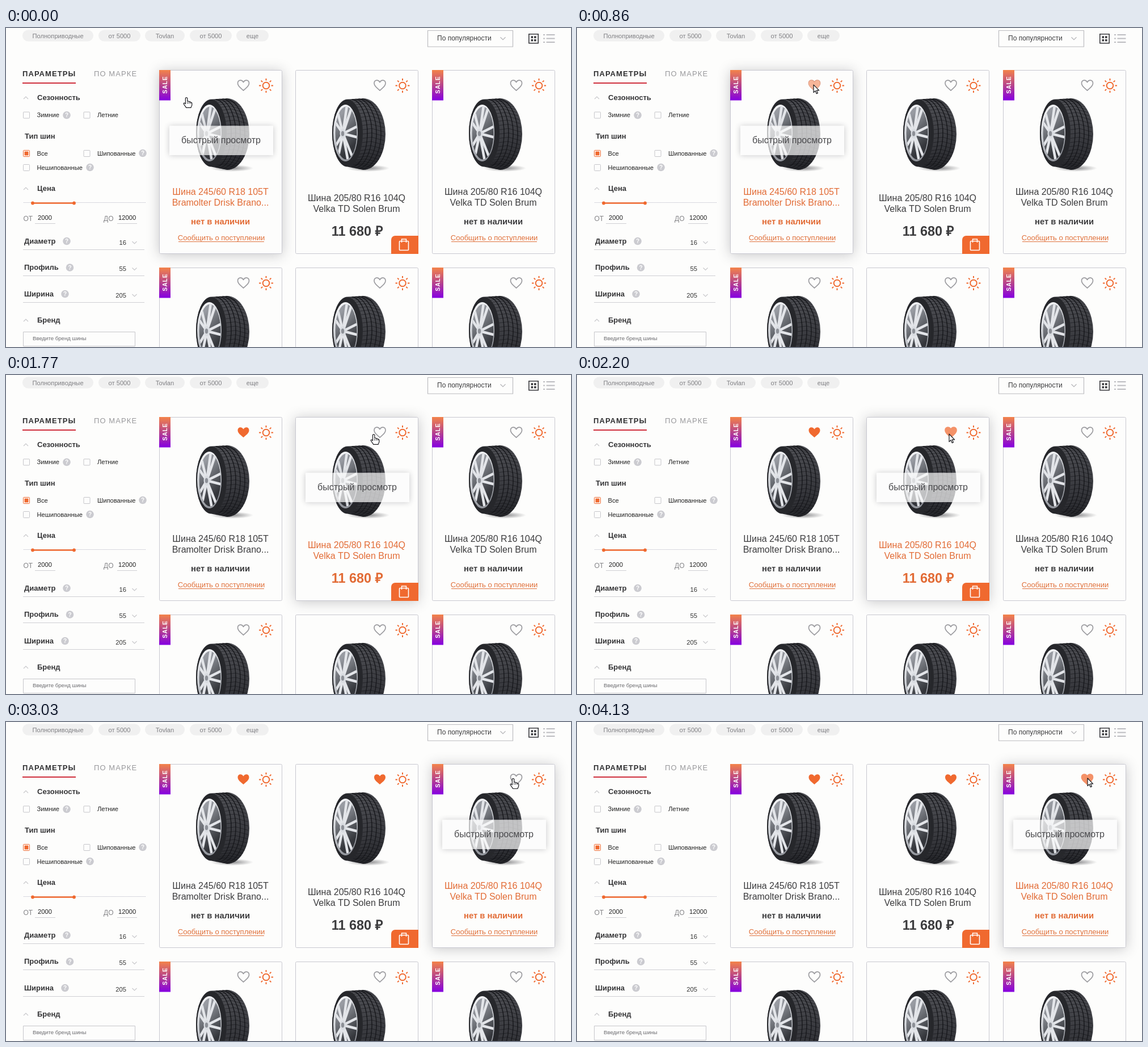
Write an HTML page with a canvas that moves like this. It is 996x562 px and loops after 4160 ms.

```html
<!DOCTYPE html>
<html lang="ru">
<head>
<meta charset="utf-8">
<title>Каталог шин</title>
<style>
html, body { margin: 0; width: 100%; height: 100%; overflow: hidden; background: #fdfdfc; }
canvas { display: block; width: 996px; height: 562px; }
</style>
</head>
<body>
<canvas id="stage"></canvas>
<script>
const W = 996, H = 562, LOOP = 4160;
const FONT = '"Liberation Sans", Arial, sans-serif';
const ORANGE = '#f0692f', BG = '#fdfdfc', LINE = '#cfcfd3';
const DARK = [60, 60, 62], HOT = [226, 107, 53];

const canvas = document.getElementById('stage');
const ctx = canvas.getContext('2d');
const dpr = window.devicePixelRatio || 1;
canvas.width = W * dpr;
canvas.height = H * dpr;

const clamp = v => Math.max(0, Math.min(1, v));
const ramp = (t, start, len) => clamp((t - start) / len);
const mix = (a, b, k) => `rgb(${a.map((v, i) => Math.round(v + (b[i] - v) * k)).join()})`;

// y is the middle of the capital letters
function text(s, x, y, size, color, { bold, align = 'left', gap = 0 } = {}) {
  ctx.font = `${bold ? 'bold ' : ''}${size}px ${FONT}`;
  ctx.letterSpacing = gap + 'px';
  ctx.textAlign = align;
  ctx.fillStyle = color;
  ctx.fillText(s, x, Math.floor(y + size * 0.36));
}

function line(points, color, width = 1) {
  ctx.beginPath();
  points.forEach(([x, y]) => ctx.lineTo(x, y));
  ctx.strokeStyle = color;
  ctx.lineWidth = width;
  ctx.stroke();
}

function box(x, y, w, h, color, width = 1, r = 0) {
  ctx.beginPath();
  ctx.roundRect(x, y, w, h, r);
  ctx.strokeStyle = color;
  ctx.lineWidth = width;
  ctx.stroke();
}

function fillBox(x, y, w, h, color, r = 0) {
  ctx.beginPath();
  ctx.roundRect(x, y, w, h, r);
  ctx.fillStyle = color;
  ctx.fill();
}

function disc(x, y, r, color) {
  ctx.beginPath();
  ctx.arc(x, y, r, 0, 7);
  ctx.fillStyle = color;
  ctx.fill();
}

function oval(x, y, rx, ry, color) {
  ctx.beginPath();
  ctx.ellipse(x, y, rx, ry, 0, 0, 7);
  ctx.fillStyle = color;
  ctx.fill();
}

function gradient(x0, y0, x1, y1, ...colors) {
  const g = ctx.createLinearGradient(x0, y0, x1, y1);
  colors.forEach((c, i) => g.addColorStop(i / (colors.length - 1), c));
  return g;
}

const chevron = (x, y, dir, color = '#c9c9cc', r = 4) =>
  line([[x - r, y - dir * r / 2], [x, y + dir * r / 2], [x + r, y - dir * r / 2]], color, 1.2);

function help(x, y) {
  disc(x, y, 6.8, '#cbcbd0');
  text('?', x, y + 0.5, 10, '#fff', { bold: true, align: 'center' });
}

function check(x, y, label, on) {
  box(x - 5.5, y - 5.5, 11, 11, on ? ORANGE : '#c6c6ca', 1, 1);
  if (on) fillBox(x - 3.5, y - 3.5, 7, 7, ORANGE);
  text(label, x + 18.5, y, 11.2, '#222');
}

function header() {
  [['Полноприводные', 29, 125], ['от 5000', 163, 74], ['Tovlan', 245, 70],
   ['от 5000', 324, 74], ['еще', 406, 57]].forEach(([s, x, w]) => {
    fillBox(x, 3.5, w, 20, '#f0f0f0', 10);
    text(s, x + w / 2, 14, 11.2, '#808084', { align: 'center' });
  });
  box(743.5, 4.5, 150, 28.5, '#bcbcc0', 1.2);
  text('По популярности', 760, 18.5, 12, '#3c3c3e');
  chevron(876, 18.5, 1, '#b5b5b9', 4.5);
  box(921.8, 10.8, 16.4, 16, '#3a3a3e', 1.6);
  for (const x of [925.5, 931]) for (const y of [14.3, 19.8]) fillBox(x, y, 3.6, 3.6, '#3a3a3e');
  for (const y of [12, 18.5, 25]) {
    fillBox(947, y - 1, 3, 2, '#bcbcc0');
    fillBox(952.5, y - 1, 15, 2, '#bcbcc0');
  }
}

function sidebar() {
  const title = (s, x, y) => text(s, x, y, 13, '#353537', { bold: true });
  text('ПАРАМЕТРЫ', 29, 80.5, 13, '#2f2f31', { bold: true, gap: 1.1 });
  text('ПО МАРКЕ', 155, 80.5, 13, '#98989b', { gap: 1.1 });
  fillBox(29, 96, 94, 2, '#cf2f3c');

  [['Сезонность', 123], ['Цена', 283], ['Бренд', 515]].forEach(([s, y]) => {
    chevron(35, y, -1);
    title(s, 55, y);
  });
  check(36, 153.5, 'Зимние');
  help(107, 153.5);
  check(142.5, 153.5, 'Летние');
  title('Тип шин', 33, 191);
  check(36, 221, 'Все', true);
  check(142.5, 221, 'Шипованные');
  help(241, 220.5);
  check(36, 246, 'Нешипованные');
  help(148, 245.5);

  ctx.setLineDash([1, 1]);
  line([[31, 307.5], [247, 307.5]], '#b4b4c4');
  ctx.setLineDash([]);
  line([[47, 308.5], [120, 308.5]], ORANGE, 2.5);
  disc(47, 308.5, 2.9, ORANGE);
  disc(120, 308.5, 2.9, ORANGE);
  text('ОТ', 30.5, 336, 12, '#858588');
  text('2000', 56, 334.5, 11.2, '#222');
  text('ДО', 172, 336, 12, '#858588');
  text('12000', 198, 334.5, 11.2, '#222');
  line([[51, 344.5], [87, 344.5]], LINE);
  line([[196, 344.5], [231, 344.5]], LINE);

  [['Диаметр', '16', 107, 375.5], ['Профиль', '55', 112.5, 422], ['Ширина', '205', 104, 468.5]]
    .forEach(([s, value, hx, y]) => {
      title(s, 32, y);
      help(hx, y);
      text(value, 212, y + 2.5, 11.2, '#333', { align: 'right' });
      chevron(226.5, y + 2.5, 1);
      const base = Math.round(y + 15) - 0.5;
      line([[30, base], [244, base]], LINE);
    });
  box(30.5, 535.5, 197, 25, '#c6c6ca');
  text('Введите бренд шины', 47, 547.5, 9.6, '#6c6c70');
}

function tire() {
  const floor = ctx.createRadialGradient(0, 0, 0, 0, 0, 1);
  floor.addColorStop(0, 'rgba(60,60,64,.6)');
  floor.addColorStop(1, 'rgba(60,60,64,0)');
  ctx.save();
  ctx.translate(398, 247);
  ctx.scale(38, 6);
  disc(0, 0, 1, floor);
  ctx.restore();

  // tread body
  ctx.beginPath();
  ctx.ellipse(362, 185, 27, 59.5, 0, Math.PI / 2, Math.PI * 1.5);
  ctx.ellipse(390, 187, 39, 63, 0, -Math.PI / 2, Math.PI / 2);
  ctx.closePath();
  ctx.fillStyle = gradient(372, 124, 408, 250, '#515257', '#44454a', '#36373c', '#242529');
  ctx.fill();

  // grooves
  ctx.save();
  ctx.clip();
  for (let i = 1; i < 5; i++) {
    const k = i / 5;
    ctx.beginPath();
    ctx.ellipse(362 + 28 * k, 185 + 2 * k, 27 + 12 * k, 59.5 + 3.5 * k, 0, -1.5, 1.5);
    ctx.strokeStyle = '#1b1c20';
    ctx.lineWidth = 1.6;
    ctx.stroke();
  }
  for (let a = -1.4; a < 1.4; a += 0.13) {
    const x = 362 + 27 * Math.cos(a), y = 185 + 59 * Math.sin(a);
    line([[x, y], [x + 16, y - 2], [x + 38, y + 4]], 'rgba(14,15,18,.5)', 1);
  }
  ctx.restore();

  // side wall and rim
  oval(362, 185, 27, 59, '#26272b');
  oval(358.5, 185, 21.5, 50, gradient(338, 150, 380, 215, '#f0f1f4', '#cdd0d5', '#94979e'));
  ctx.save();
  oval(359.5, 185, 19, 46.5, gradient(342, 160, 380, 200, '#989ba2', '#62656b', '#34363b'));
  ctx.clip();
  const hub = [354, 186];
  for (let i = 0; i < 5; i++) {
    const a = -1.3 + i * Math.PI * 0.4;
    for (const side of [-0.2, 0.2]) {
      line([hub, [359.5 + 20 * Math.cos(a + side), 185 + 48 * Math.sin(a + side)]], '#e3e5e9', 4.5);
    }
  }
  ctx.restore();
  oval(hub[0], hub[1], 5.5, 9, '#d9dce1');
  oval(hub[0] - 0.5, hub[1], 2.7, 4.5, '#8d9097');
}

function heart(fill) {
  ctx.beginPath();
  ctx.moveTo(418.5, 110);
  ctx.bezierCurveTo(414, 106, 408.5, 102.5, 408.5, 97.5);
  ctx.bezierCurveTo(408.5, 91, 416, 90.5, 418.5, 95.5);
  ctx.bezierCurveTo(421, 90.5, 428.5, 91, 428.5, 97.5);
  ctx.bezierCurveTo(428.5, 102.5, 423, 106, 418.5, 110);
  ctx.closePath();
  ctx.lineJoin = 'round';
  ctx.lineWidth = 1.7;
  ctx.strokeStyle = mix([156, 156, 160], [243, 145, 106], clamp(fill / 0.7));
  if (fill < 1) ctx.stroke();
  if (fill > 0) {
    ctx.fillStyle = mix([253, 253, 252], [240, 105, 47], fill);
    ctx.fill();
  }
}

function sun() {
  ctx.beginPath();
  ctx.arc(458.5, 101.5, 5.8, 0, 7);
  ctx.strokeStyle = ORANGE;
  ctx.lineWidth = 2;
  ctx.stroke();
  for (let i = 0; i < 8; i++) {
    const c = Math.cos(i * Math.PI / 4), s = Math.sin(i * Math.PI / 4);
    line([[458.5 + 9 * c, 101.5 + 9 * s], [458.5 + 12.5 * c, 101.5 + 12.5 * s]], ORANGE, 2);
  }
}

function saleBadge() {
  fillBox(270, 74, 20, 53.5, gradient(0, 74, 0, 127, '#f3834a', '#b8458a', '#8600e0'));
  ctx.save();
  ctx.translate(280, 100.5);
  ctx.rotate(-Math.PI / 2);
  text('SALE', 0.5, 0.5, 10.3, '#fff', { bold: true, align: 'center', gap: 1 });
  ctx.restore();
}

function bagButton() {
  fillBox(439, 366, 48, 32, ORANGE, [7, 0, 0, 0]);
  box(453.5, 375.5, 16, 16, '#fff', 1.6, 1);
  line([[457.5, 378], [457.5, 372], [465.5, 372], [465.5, 378]], '#fff', 1.5);
}

const goods = [
  ['Шина 245/60 R18 105T', 'Bramolter Drisk Brano...'],
  ['Шина 205/80 R16 104Q', 'Velka TD Solen Brum'],
  ['Шина 205/80 R16 104Q', 'Velka TD Solen Brum']
];

function card(col, row, hover, liked) {
  const mid = 378, center = { align: 'center' }, strong = { align: 'center', bold: true };
  const ink = mix(DARK, HOT, hover), priced = col === 1;
  ctx.save();
  ctx.translate([0, 240, 481][col], row * 348);
  ctx.save();
  if (hover > 0) {
    ctx.shadowColor = `rgba(40,40,50,${0.25 * hover})`;
    ctx.shadowBlur = 22 * dpr;
    ctx.shadowOffsetY = 2 * dpr;
  }
  fillBox(270, 74, 217, 324, BG, 2);
  ctx.restore();
  box(270.5, 74.5, 216, 323, '#c8c8d0', 1, 2);
  if (!priced) saleBadge();
  tire();
  ctx.save();
  if (priced) ctx.translate(0.5, 0);
  heart(liked);
  sun();
  ctx.restore();

  const top = priced ? 300 : 289;
  text(goods[col][0], mid, top, 16, ink, center);
  text(goods[col][1], mid, top + 18.6, 16, ink, center);
  if (priced) {
    text('11 680 ₽', mid + 1, 358, 23.4, ink, strong);
    bagButton();
  } else {
    text('нет в наличии', mid, 341, 14.8, ink, strong);
    text('Сообщить о поступлении', mid + 1.5, 370, 13, '#e0703a', center);
    line([[304, 376.5], [455, 376.5]], '#e0703a');
  }

  if (hover > 0) {
    ctx.globalAlpha = hover;
    ctx.save();
    ctx.beginPath();
    ctx.rect(250, 150, 260, 100);
    ctx.rect(288, 172.5, 183, 51.5);
    ctx.clip('evenodd');
    ctx.shadowColor = 'rgba(40,40,50,.25)';
    ctx.shadowBlur = 10 * dpr;
    fillBox(288, 172.5, 183, 51.5, '#fff');
    ctx.restore();
    fillBox(288, 172.5, 183, 51.5, 'rgba(253,253,253,.7)', 2);
    text('быстрый просмотр', mid + 1, 198, 16, '#4a4a4d', center);
  }
  ctx.restore();
}

const HAND = new Path2D('M-1.8 1 C-1.8 -.8 1.6 -.8 1.6 1 V6.3 C2.6 5.6 4.4 6 4.6 7.2 ' +
  'C5.8 6.5 7.2 7 7.4 8.2 C8.8 7.8 9.6 8.6 9.6 10 V12.5 C9.6 14.5 8 15.5 7.8 17.5 H-.6 ' +
  'C-1 15.4 -4.6 12.4 -5 10.4 C-5.2 8.8 -3.4 8.6 -1.8 10.8 Z');
const ARROW = new Path2D('M0 0 V13.6 L3.1 10.7 L5.2 15.6 L7.4 14.6 L5.3 9.9 H9.6 Z');

function cursor(x, y, arrow) {
  const shape = arrow ? ARROW : HAND;
  ctx.save();
  ctx.translate(x, y);
  ctx.lineJoin = 'round';
  ctx.lineWidth = 1.2;
  ctx.fillStyle = '#fff';
  ctx.strokeStyle = '#1c1c20';
  ctx.fill(shape);
  ctx.stroke(shape);
  if (!arrow) for (const fx of [1.6, 4.6, 7.4]) line([[fx, 7.5], [fx, 10.5]], '#1c1c20', 1);
  ctx.restore();
}

// time, x, y of the pointer tip
const route = [[0, 318, 123], [360, 383, 103], [540, 416, 99], [1150, 418, 101], [1330, 486.5, 103],
  [1770, 648, 105], [1800, 656, 104], [2400, 656, 104], [2600, 729, 105], [3030, 894, 100],
  [3080, 900, 99], [LOOP, 900, 99]];

function pointer(t) {
  const i = Math.max(1, route.findIndex(p => p[0] > t));
  const [a, b] = [route[i - 1], route[i]], k = ramp(t, a[0], b[0] - a[0]);
  return [a[1] + (b[1] - a[1]) * k, a[2] + (b[2] - a[2]) * k];
}

const hovers = [[-1000, 1340], [1400, 2610], [2665, 9999]];
const likes = [[780, 1150], [2080, 2400], [3480, 9999]];

const hoverOf = (i, t) => ramp(t, hovers[i][0], 180) - ramp(t, hovers[i][1], 180);
const likeOf = (i, t) => 0.72 * ramp(t, likes[i][0], 120) + 0.28 * ramp(t, likes[i][1], 100);
const within = (t, [from, to]) => t >= from && t < to;

function draw(t) {
  ctx.setTransform(dpr, 0, 0, dpr, 0, 0);
  ctx.fillStyle = BG;
  ctx.fillRect(0, 0, W, H);
  header();
  sidebar();
  for (let i = 0; i < 3; i++) card(i, 1, 0, 0);
  [0, 1, 2].sort((a, b) => hoverOf(a, t) - hoverOf(b, t))
    .forEach(i => card(i, 0, hoverOf(i, t), likeOf(i, t)));
  const arrow = likes.some(s => within(t, s)) || !hovers.some(s => within(t, s));
  cursor(...pointer(t), arrow);
}

const start = performance.now();
function tick() {
  draw((performance.now() - start) % LOOP);
  requestAnimationFrame(tick);
}
tick();
</script>
</body>
</html>
```
